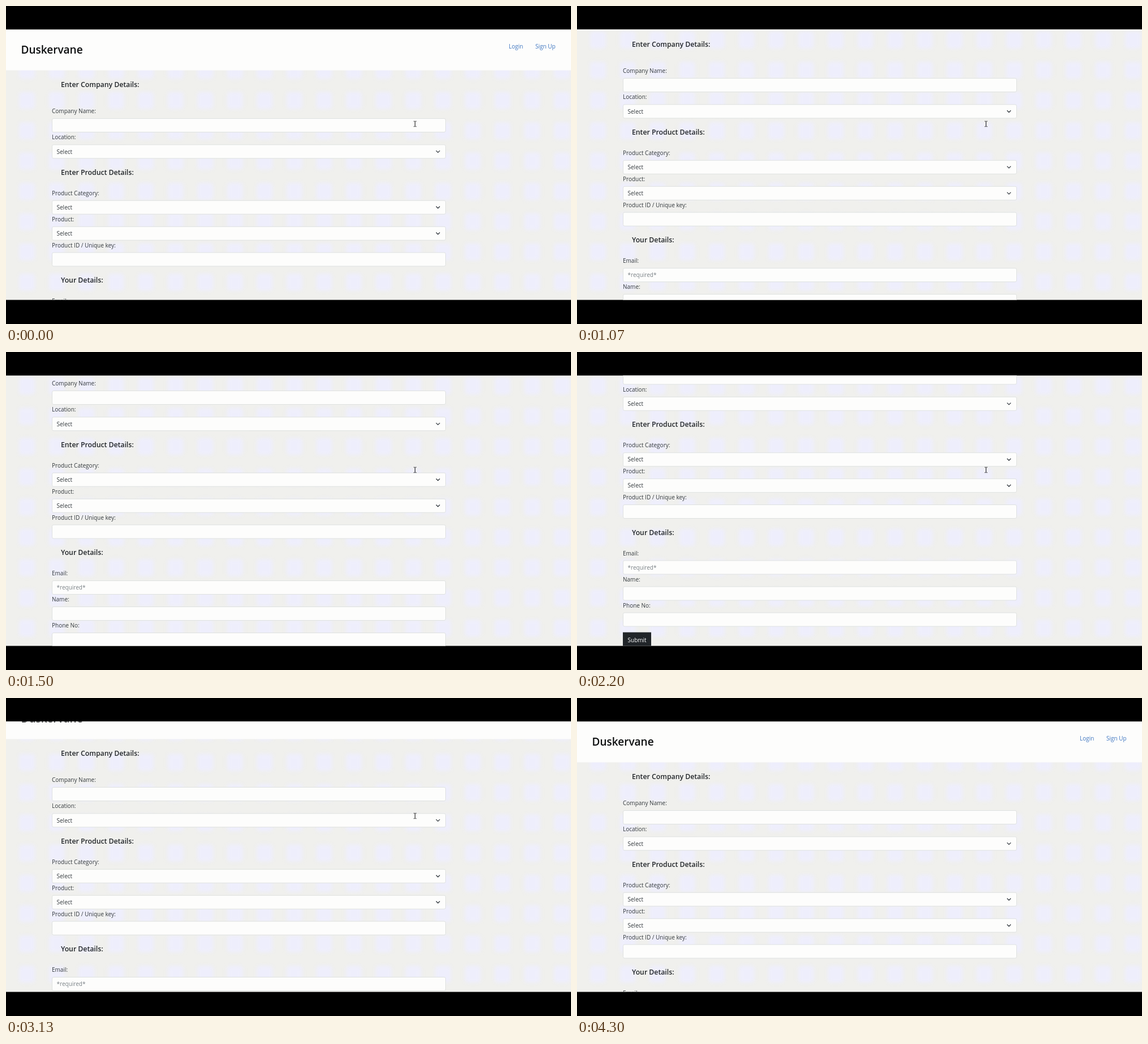
These frames come from a looping animation (998x561 px, 4360 ms). An HTML page with a canvas:

```html
<!DOCTYPE html>
<html lang="en">
<head>
<meta charset="utf-8">
<title>Scrolling form</title>
<style>
  html, body { margin: 0; width: 100%; height: 100%; overflow: hidden; background: #000; }
  canvas { display: block; }
</style>
</head>
<body>
<canvas id="stage" width="998" height="561"></canvas>
<script>
const WIDTH = 998, HEIGHT = 561;
const VIEW_TOP = 41.5, VIEW_BOTTOM = 518.5;
const LOOP = 4360, FRAME = 100 / 3;
const LEFT = 81, FIELD_WIDTH = 696, FIELD_HEIGHT = 25;
const FAMILY = '"Open Sans", "Noto Sans", sans-serif';
const INK = '#212529';

const ctx = document.getElementById('stage').getContext('2d');

const headings = [
  ['Enter Company Details:', 142.5],
  ['Enter Product Details:', 297.5],
  ['Your Details:', 488]
];

// label, label baseline, field top, kind or placeholder
const fields = [
  ['Company Name:', 189, 198],
  ['Location:', 235.3, 244.3, 'select'],
  ['Product Category:', 333.5, 342.7, 'select'],
  ['Product:', 379.7, 388.7, 'select'],
  ['Product ID / Unique key:', 425.5, 434.5],
  ['Email:', 524, 533, '*required*'],
  ['Name:', 570, 579],
  ['Phone No:', 616, 625]
];

// start, end, from, to, ease-out power
const scrolls = [
  [932, 1430, 0, 130, 2.5],
  [1995, 2200, 130, 165.5, 2.5],
  [2897, 3400, 165.5, 0, 2.2]
];

const clamp01 = v => Math.min(1, Math.max(0, v));

function scrollAt(time) {
  let y = 0;
  for (const [start, end, from, to, power] of scrolls) {
    if (time < start) break;
    const p = clamp01((time - start) / (end - start));
    y = from + (to - from) * (1 - (1 - p) ** power);
  }
  return y;
}

function cursorAt(time) {
  const p = Math.max(0, (time - 3490) / 420);
  return time < 4000 ? [722.5 - 80 * p, 208 + 320 * p ** 4] : null;
}

function makeBackground() {
  const canvas = document.createElement('canvas');
  canvas.width = WIDTH;
  canvas.height = HEIGHT;
  const bg = canvas.getContext('2d');
  bg.fillStyle = '#f0f0ed';
  bg.fillRect(0, 0, WIDTH, HEIGHT);
  bg.filter = 'blur(3px)';
  bg.fillStyle = '#eeeefc';
  for (let x = 37; x < WIDTH; x += 52.5) {
    for (let y = 60; y < VIEW_BOTTOM; y += 53.4) {
      bg.beginPath();
      bg.roundRect(x - 14, y - 15, 28, 30, 5);
      bg.fill();
    }
  }
  return canvas;
}

const background = makeBackground();

function text(string, x, y, color = INK, size = 10, weight = 400) {
  ctx.font = `${weight} ${size}px ${FAMILY}`;
  ctx.fillStyle = color;
  ctx.fillText(string, x, y);
}

function polyline(color, width, ...points) {
  ctx.strokeStyle = color;
  ctx.lineWidth = width;
  ctx.beginPath();
  for (const [x, y] of points) ctx.lineTo(x, y);
  ctx.stroke();
}

function drawField([label, baseline, top, kind]) {
  text(label, LEFT, baseline, '#343a3e');
  ctx.beginPath();
  ctx.roundRect(LEFT + 0.5, top + 0.5, FIELD_WIDTH - 1, FIELD_HEIGHT - 1, 2.5);
  ctx.fillStyle = '#fdfdfc';
  ctx.fill();
  ctx.strokeStyle = '#d9dcdb';
  ctx.lineWidth = 0.8;
  ctx.stroke();
  const middle = top + FIELD_HEIGHT / 2;
  if (kind === 'select') {
    text('Select', 89.5, middle + 3.7, '#343a3e');
    polyline('#343a40', 1.3, [759.7, middle - 1.7], [763, middle + 1.6], [766.3, middle - 1.7]);
  } else if (kind) {
    text(kind, 89.5, middle + 3.7, '#7b8287');
  }
}

function drawPage() {
  ctx.fillStyle = '#fdfdfc';
  ctx.fillRect(0, VIEW_TOP, WIDTH, 72);
  text('Duskervane', 26.5, 83.5, '#0b0d0e', 19, 600);
  text('Login', 888, 75, '#3f76c0');
  text('Sign Up', 935, 75, '#3f76c0');

  for (const [title, y] of headings) text(title, 97, y, INK, 12.25, 600);
  fields.forEach(drawField);

  ctx.fillStyle = INK;
  ctx.fillRect(LEFT, 660, 50, 26);
  text('Submit', 89.5, 677, '#fff');
}

function drawCursor([x, y]) {
  polyline('#111', 1, [x, y - 4], [x, y + 4]);
  for (const side of [-1, 1]) {
    polyline('#111', 1, [x, y - 4], [x + side, y - 4.7], [x + side * 2.3, y - 4.7]);
    polyline('#111', 1, [x, y + 4], [x + side, y + 4.7], [x + side * 2.3, y + 4.7]);
  }
}

function draw(time) {
  ctx.fillStyle = '#000';
  ctx.fillRect(0, 0, WIDTH, HEIGHT);
  ctx.save();
  ctx.beginPath();
  ctx.rect(0, VIEW_TOP, WIDTH, VIEW_BOTTOM - VIEW_TOP);
  ctx.clip();
  ctx.drawImage(background, 0, 0);
  ctx.save();
  ctx.translate(0, -scrollAt(time));
  drawPage();
  ctx.restore();
  const cursor = cursorAt(time);
  if (cursor) drawCursor(cursor);
  ctx.restore();
}

const origin = performance.now();

function tick() {
  const elapsed = (performance.now() - origin) % LOOP;
  draw(Math.floor((elapsed + 5) / FRAME) * FRAME);
  requestAnimationFrame(tick);
}

tick();
</script>
</body>
</html>
```
